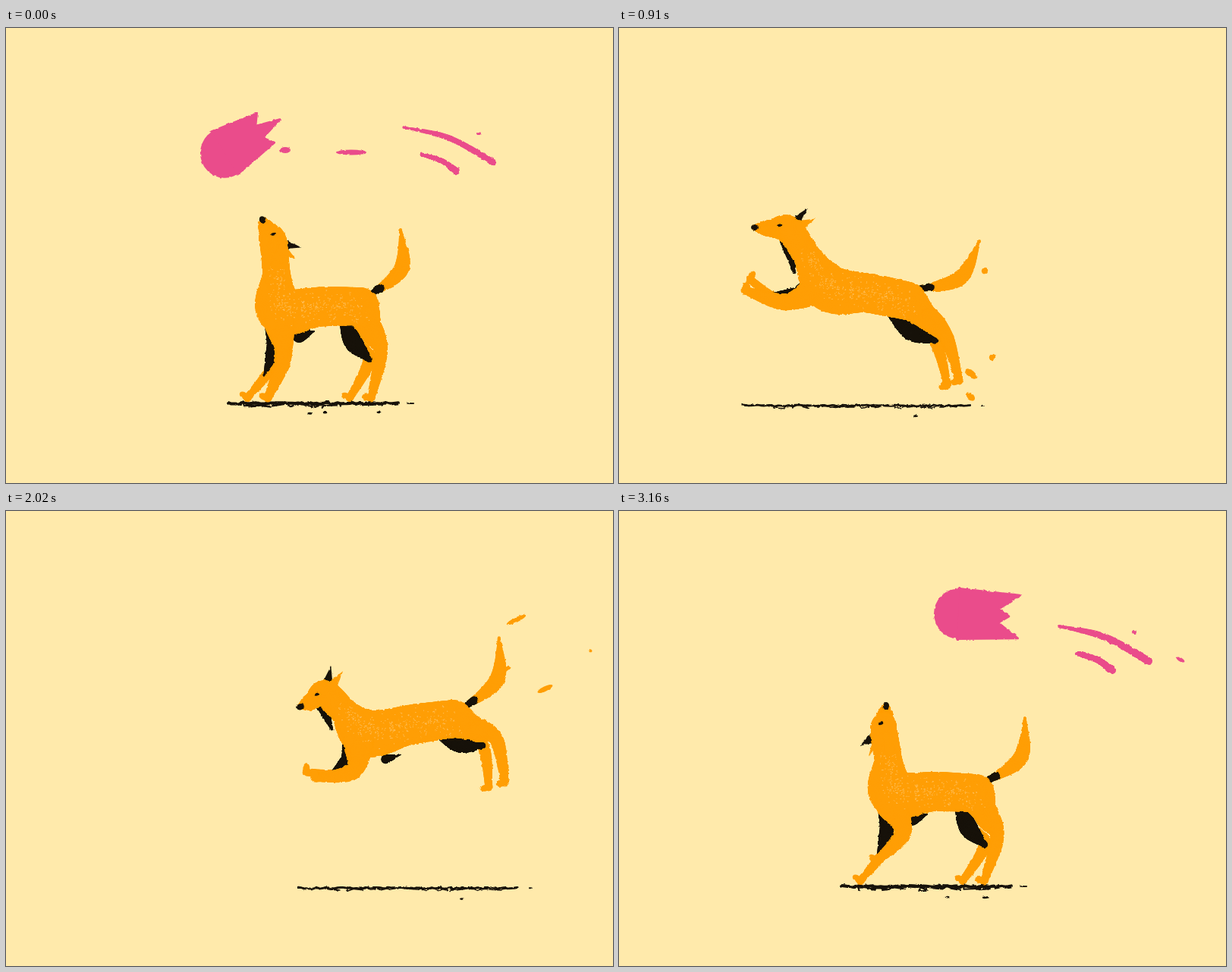
Animation, 800 px wide and 600 px high, one loop 3230 ms. Source, as an HTML page with a canvas:

```html
<!DOCTYPE html>
<html lang="en">
<head>
<meta charset="utf-8">
<title>Dog and ball</title>
<style>
  html, body { margin: 0; width: 100%; height: 100%; overflow: hidden; background: #ffeaab; }
  canvas { display: block; filter: url(#rough); }
  svg { position: absolute; width: 0; height: 0; }
</style>
</head>
<body>
<canvas id="stage" width="800" height="600"></canvas>
<svg><filter id="rough" x="0" y="0" width="1" height="1" color-interpolation-filters="sRGB">
  <feTurbulence type="fractalNoise" baseFrequency=".2" numOctaves="2" seed="4" result="n"/>
  <feDisplacementMap in="SourceGraphic" in2="n" scale="3" xChannelSelector="R" yChannelSelector="G"/>
</filter></svg>
<script>
const ctx = document.getElementById('stage').getContext('2d');
const ORANGE = '#ff9e05', INK = '#17120a', PINK = '#ea4c8b', LIGHT = '#ffbd55';
const LOOP = 3230, THROW = 3030;
const STEPS = [0, 130, 260, 390, 520, 650, 780, 910, 1010, 1080, 1140, 1210,
  1880, 1950, 2020, 2120, 2250, 2380, 2510, 2640, 2770, 2900, 3030, 3160];

const clamp = v => Math.min(1, Math.max(0, v));
const add = (a, x, y) => [a[0] + x, a[1] + y];
const lerp = (a, b, t) => a.map((n, i) => n + (b[i] - n) * t);
const along = (a, dir, len) => add(a, dir[0] * len, dir[1] * len);
const polar = (a, angle, len) => add(a, Math.cos(angle) * len, Math.sin(angle) * len);
const aim = (a, b) => Math.atan2(b[1] - a[1], b[0] - a[0]);
const unit = (a, b) => polar([0, 0], aim(a, b), 1);
const random = seed => () => (seed = seed * 16807 % 2147483647) / 2147483647;

// Poses: a few joints each, the rest of the body follows from them.
const stand = {
  nose: [322, 328], skull: [341, 302], chest: [362, 372], hip: [467, 367], tail: [520, 266],
  foreN: [345, 488], foreF: [318, 488], hindN: [481, 488], hindF: [453, 488], side: [1]
};
const lookBack = { ...stand, nose: [338, 253], skull: [352, 282] };
const lookUp = { ...stand, nose: [352, 257], skull: [349, 290], hip: [470, 372], tail: [535, 273], foreN: [339, 462], side: [-1] };
const alert = { ...stand, nose: [293, 335], skull: [340, 324], chest: [369, 392], hip: [463, 362], tail: [502, 250] };
const crouch = {
  ...stand, nose: [292, 380], skull: [320, 350], chest: [368, 408], hip: [458, 388], tail: [516, 281],
  foreN: [334, 484], foreF: [312, 484], hindN: [481, 484], hindF: [447, 484]
};
const leap = {
  ...stand, nose: [179, 263], skull: [224, 266], chest: [277, 343], hip: [381, 360], tail: [475, 281],
  foreN: [166, 346], foreF: [172, 331], hindN: [448, 465], hindF: [433, 471]
};

const eachJoint = (pose, fn) =>
  Object.fromEntries(Object.entries(pose).map(([k, v]) => [k, k === 'side' ? v : fn(v, k)]));
const shift = (pose, x, y) => eachJoint(pose, p => add(p, x, y));
const turn = (pose, angle) => eachJoint(pose, p =>
  polar(pose.chest, aim(pose.chest, p) + angle, Math.hypot(p[0] - pose.chest[0], p[1] - pose.chest[1])));
const blend = (a, b, t) => ({ ...eachJoint(a, (p, k) => lerp(p, b[k], t)), side: lerp(a.side, b.side, t) });

const arrive = { ...shift(leap, 560, -125), nose: [735, 137], skull: [772, 143], chest: [812, 208], foreN: [709, 220], foreF: [709, 206] };
const KEYS = [
  [0, lookBack], [390, alert], [780, shift(crouch, 14, 2)], [910, leap], [1140, shift(leap, -430, -92)], [1210, null],
  [1880, arrive], [1950, shift(turn(arrive, -0.35), -260, 5)], [2250, crouch], [2770, stand], [3160, lookUp]
];

function poseAt(t) {
  const i = KEYS.findLastIndex(k => k[0] <= t);
  const [t0, a] = KEYS[i], [t1, b] = KEYS[i + 1] || [LOOP, null];
  if (!a || !b) return a;
  return blend(a, b, 1 - (1 - (t - t0) / (t1 - t0)) ** 2);
}

function dot([x, y], rx, ry, colour, angle = 0) {
  ctx.fillStyle = colour;
  ctx.beginPath();
  ctx.ellipse(x, y, rx, ry, angle, 0, 7);
  ctx.fill();
}

// Smooth stroke through points whose radius changes from point to point.
function limb(points, radii, colour, end = 1) {
  const at = i => points[Math.min(points.length - 1, Math.max(0, i))];
  const n = points.length - 1, total = n * 40 * end;
  for (let s = 0; s <= total; s++) {
    const i = Math.min(n - 1, Math.floor(s / 40)), f = s / 40 - i;
    const [p, a, b, q] = [at(i - 1), at(i), at(i + 1), at(i + 2)];
    const c = [0, 1].map(k => a[k] + f / 2 * (b[k] - p[k] +
      f * (2 * p[k] - 5 * a[k] + 4 * b[k] - q[k] + f * (3 * (a[k] - b[k]) + q[k] - p[k]))));
    const r = radii[i] + (radii[i + 1] - radii[i]) * f * f * (3 - 2 * f);
    dot(c, r, r, colour);
  }
}

function shape(points, colour) {
  ctx.fillStyle = colour;
  ctx.beginPath();
  points.forEach(p => ctx.lineTo(...p));
  ctx.fill();
}

// Middle joint of a two-bone leg, bending towards the tail.
function joint(top, foot, upper, lower) {
  const d = Math.hypot(foot[0] - top[0], foot[1] - top[1]), u = unit(top, foot);
  const x = (upper ** 2 - lower ** 2 + d * d) / (2 * d);
  const h = 0.65 * Math.sqrt(Math.max(0, upper ** 2 - x * x));
  return add(top, u[0] * x + u[1] * h, u[1] * x - u[0] * h);
}

function paw(knee, foot) {
  const [x, y] = unit(knee, foot);
  dot(add(foot, -y * 5, x * 5), 7, 4.5, ORANGE, aim(knee, foot) + Math.PI / 2);
}

function foreleg(chest, foot, far) {
  const top = along(chest, unit(chest, foot), far ? 26 : 15);
  const elbow = joint(top, foot, 50, 59);
  limb([top, elbow, foot], far ? [10, 7, 5] : [20, 11, 5.5], ORANGE);
  paw(elbow, foot);
  if (far) limb([top, lerp(top, elbow, 0.6), lerp(elbow, foot, 0.35)], [11, 9, 1], INK);
}

function hindleg(hip, foot, far) {
  const top = far ? add(hip, -19, 16) : hip;
  const hock = joint(top, foot, 70, 66), [x, y] = unit(top, hock);
  const thigh = add(lerp(top, hock, 0.5), far ? -y * 7 : 0, far ? x * 7 : 0);
  limb([top, thigh, hock, foot], far ? [6, 10, 8, 5] : [24, 16, 9, 5.5], ORANGE);
  paw(hock, foot);
  if (far) limb([top, thigh, hock], [9, 12, 4], INK);
}

function ear(skull, angle, colour) {
  const root = polar(skull, angle, 10);
  shape([polar(root, angle - 1.57, 8), polar(skull, angle, 38), polar(root, angle + 1.57, 8)], colour);
}

function tail(hip, tip) {
  const base = add(hip, 15, -16), [x, y] = unit(base, tip);
  const curve = [base, add(lerp(base, tip, 0.5), -y * 22, x * 22), tip], width = [4, 10, 2];
  limb(curve, width, ORANGE);
  limb(curve, width, INK, 0.17);
}

function flecks(spine) {
  const rnd = random(71);
  for (let i = 0; i < 320; i++) {
    const j = Math.floor(rnd() * 3), p = lerp(spine[j], spine[j + 1], rnd());
    dot(polar(p, rnd() * 6.3, rnd() * (j ? 23 : 16)), 0.5 + rnd() * 0.6, 0.6, LIGHT);
  }
}

function drawDog({ nose, skull, chest, hip, tail: tip, foreN, foreF, hindN, hindF, side: [side] }) {
  const neck = lerp(skull, chest, 0.42), loin = add(lerp(chest, hip, 0.5), 0, -2);
  const muzzle = lerp(skull, nose, 0.55), back = aim(nose, skull);
  const down = clamp(unit(chest, foreN)[1]);

  hindleg(hip, hindF, true);
  foreleg(chest, foreF, true);
  limb([add(skull, -4, 14), add(neck, -15, 24)], [8, 2], INK);
  limb([add(chest, 24, 34), add(chest, 44, 28)], [9 * down, down], INK);
  ear(skull, back - 0.92 * side, INK);
  tail(hip, tip);
  limb([nose, muzzle, skull, neck, chest, loin, hip], [4, 11, 18, 18, 31, 26, 25], ORANGE);
  ear(skull, back - 0.46 * side, ORANGE);
  hindleg(hip, hindN, false);
  foreleg(chest, foreN, false);
  flecks([neck, chest, loin, hip]);
  dot(nose, 5, 4, INK, back);
  dot(polar(lerp(skull, nose, 0.28), back - 1.57 * side, 5), 3.5, 1.8, INK, -0.2);
}

function line(points, width) {
  ctx.beginPath();
  points.forEach(p => ctx.lineTo(...p));
  ctx.lineWidth = width;
  ctx.strokeStyle = INK;
  ctx.stroke();
}

// Scribbled shadow under the dog, thinner the higher it flies.
function drawGround({ foreF, hindN }, seed) {
  const air = clamp((488 - foreF[1]) / 300), weight = 1 - 0.7 * clamp(air * 1.5);
  const from = foreF[0] - 25 + 30 * air, to = hindN[0] + 38 - 40 * air;
  const y = 495 + 20 * air ** 3, rnd = random(seed + 17), core = [], loops = [];
  for (let x = from; x <= to; x += 4) {
    const fade = Math.min(1, (x - from) / 40, (to - x) / 40);
    core.push([x, y + (rnd() - 0.5) * 2]);
    loops.push([x + (rnd() - 0.5) * 22 * fade, y + (rnd() * 8 - 2) * fade * (0.4 + 0.6 * weight)]);
  }
  line(core, 1.5 + 2.5 * weight);
  line(loops, 1 + weight);
  for (let i = 0; i < 4 * weight - 1; i++) dot([from + 100 + rnd() * 130, y + 11 + rnd() * 4], 3, 1.4, INK);
  dot([to + 14, y], 5 * weight, 1, INK);
}

// u: time since the ball came into view.
function drawBall(u) {
  const c = [672 - 1.38 * u - 0.0027 * u * u, 134 + 0.0038 * (u - 110) ** 2];
  const late = Math.max(0, u - 130), rot = 0.05 - late * 0.0085, flip = late ? -1 : 1;
  const edge = [polar(c, rot - 1.57, 33)];
  for (let k = -1; k <= 1; k++) {
    edge.push(polar(c, rot + k * 0.34, 76 + 9 * flip * (k ? 1 : -1)));
    if (k < 1) edge.push(polar(c, rot + (k + 0.5) * 0.34, 54));
  }
  edge.push(polar(c, rot + 1.57, 33));
  dot(c, 32, 33, PINK);
  shape(edge, PINK);
  ctx.strokeStyle = PINK;
  ctx.lineWidth = 3;
  ctx.stroke();
  if (u >= 130) drawTrail(late);
}

function drawTrail(late) {
  const drift = (x, y) => [x - 0.8 * late, y - 0.3 * late];
  const size = 1 - late / 400;
  limb([drift(580, 152), drift(640, 166), drift(698, 198)], [2, 4.5, 5].map(r => r * size), PINK);
  limb([drift(604, 188), drift(630, 196), drift(650, 210)], [3, 4, 5].map(r => r * size), PINK);
  dot(drift(679, 160), 3, 2, PINK);
  if (late) {
    dot(drift(511, 185), 20, 3.5, PINK);
    dot(drift(424, 182), 7, 4, PINK);
  } else dot(drift(740, 196), 6, 2.5, PINK, 0.5);
}

// Crayon drops left behind by the jump off and by the landing.
function drawDrops(t) {
  const off = t - 910, land = 2250 - t;
  if (off >= 0 && off < 300) {
    for (const [x, y, r] of [[482, 320, 4], [492, 434, 4], [464, 456, 9], [463, 486, 7]])
      dot([x - off * 1.2, y - off * 0.4], r, 4.5, ORANGE, 0.7);
  }
  if (land >= 0 && land <= 230) {
    for (const [x, y, r] of [[592, 132, 14], [574, 199, 11], [630, 223, 11], [690, 173, 2]])
      dot([x + land * 0.35, y + land * 0.05], r, Math.min(r, 3.2), ORANGE, -0.45);
  }
}

function draw(t) {
  ctx.clearRect(0, 0, 800, 600);
  ctx.lineCap = ctx.lineJoin = 'round';
  const pose = poseAt(t), u = (t - THROW + LOOP) % LOOP;
  if (pose) {
    drawGround(pose, t);
    drawDog(pose);
  }
  drawDrops(t);
  if (u < 400) drawBall(u);
}

let shown;
function tick() {
  const now = performance.now() % LOOP, t = STEPS.findLast(s => s <= now);
  if (t !== shown) draw(shown = t);
  requestAnimationFrame(tick);
}
tick();
</script>
</body>
</html>
```
